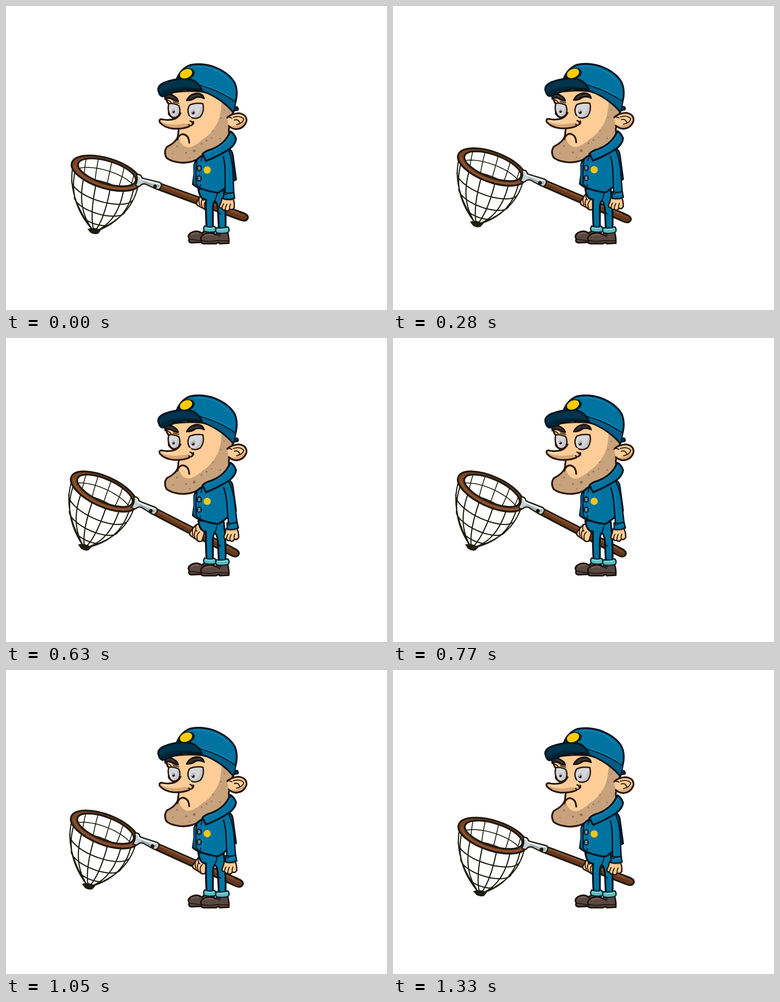
These frames come from a looping animation (838x669 px, 1400 ms). An HTML page:

```html
<!DOCTYPE html>
<html lang="en">
<head>
<meta charset="utf-8">
<title>Man with a landing net</title>
<style>
  html, body { margin: 0; width: 100%; height: 100%; overflow: hidden; background: #fff; }
  svg { display: block; width: 838px; height: 669px; }
  path, ellipse, circle { stroke-linejoin: round; stroke-linecap: round; }
  .line { fill: none; }
  .ink { stroke: #04141f; stroke-width: 4; }
  .skinInk { stroke: #2a160a; stroke-width: 3.8; }
  .mid { stroke-width: 3; }
  .thin { stroke-width: 2.2; }
  .blue { fill: #0073a1; }
  .shade { fill: #005d88; }
  .skin { fill: #fecd97; }
  .glow { fill: none; stroke: #1488b8; stroke-width: 1.8; }
  .wood { fill: #7d4525; }
  .mesh { fill: none; stroke: #1d1c0f; }
</style>
</head>
<body>
<svg viewBox="0 0 838 669" width="838" height="669">
  <defs>
    <clipPath id="hole"><ellipse cx="222" cy="366" rx="66" ry="25" transform="rotate(17 222 366)"/></clipPath>
    <clipPath id="faceClip"><path id="faceShape"/></clipPath>
  </defs>

  <g id="net">
    <path id="backMesh" class="mesh" stroke-width="1.9" clip-path="url(#hole)"/>
    <path id="frontMesh" class="mesh" stroke-width="2.5"/>
    <path d="M179 491 Q193 485 209 493 L203 501 Q194 504 186 499Z" fill="#1d1c0f"/>
    <path d="M339 391 L520 455 Q533 459 532 466 Q529 475 517 471 L336 404Z" class="wood" stroke="#1f1a0d" stroke-width="4.2"/>
    <path d="M340 402 L518 468 Q528 470 529 464 L516 461 L341 398Z" fill="#64361c"/>
    <path d="M344 395 L512 455" class="line" stroke="#9a5a34" stroke-width="1.8"/>
    <g id="rim"></g>
    <path d="M287 371 Q297 369 299 378 L305 380 L338 388 Q344 391 341 398 Q338 406 331 403 L307 392 Q299 390 295 396 Q289 399 285 394 Q291 383 287 371Z" fill="#c3d0d4" stroke="#1f1a0d" stroke-width="2.8"/>
    <path d="M290 374 Q296 374 296 381 L334 391" class="line" stroke="#f3f8f9" stroke-width="2.2"/>
    <path d="M303 387 L327 396" class="line" stroke="#8799a0" stroke-width="2"/>
    <circle cx="328" cy="397" r="4.4" fill="#1f1a0d"/><circle cx="334" cy="396" r="2.6" fill="#96a7ac"/>
    <path class="skin skinInk mid" d="M431 414 Q437 410 443 414 L451 430 L448 448 Q441 452 435 446 L421 439 Q417 434 421 429 L425 422Z"/>
    <path class="line skinInk thin" d="M425 423 Q423 431 427 439 M432 425 Q427 433 432 443 M440 429 Q433 436 438 447 M431 416 Q429 423 434 428"/>
  </g>

  <g id="legs">
    <path class="blue ink" d="M423 402 L479 405 Q484 450 483 489 L468 489 L466 446 Q464 431 459 429 Q455 433 455 448 L455 488 L441 487 Q439 449 440 426 Q426 426 423 402Z"/>
    <path class="line ink thin" d="M459 429 Q463 421 464 413 M468 455 L472 458"/>
    <path class="glow" d="M445 430 L446 481 M478 426 L479 482" opacity=".5"/>
    <path d="M403 512 Q398 505 407 499 Q420 492 431 500 L437 494 L457 496 L460 521 L430 520 L408 521 Q400 520 403 512Z" fill="#5a4740" stroke="#1c1310" stroke-width="3.4"/>
    <path d="M403 513 L430 517" class="line" stroke="#1c1310" stroke-width="2"/>
    <path d="M408 503 Q415 498 423 500" class="line" stroke="#80695f" stroke-width="2.4"/>
    <path d="M430 517 Q425 508 436 502 Q449 496 461 503 L467 497 L487 497 Q491 509 490 522 L470 523 L468 520 L462 523 L434 523 Q428 522 430 517Z" fill="#5a4740" stroke="#1c1310" stroke-width="3.4"/>
    <path d="M431 516 Q449 520 463 516 L489 517 M464 504 L470 507 M466 501 L472 504" class="line" stroke="#1c1310" stroke-width="2"/>
    <path d="M437 506 Q446 501 455 504" class="line" stroke="#80695f" stroke-width="2.4"/>
    <g fill="#58bcc0" stroke="#08252b" stroke-width="2.8">
      <path d="M437 484 Q448 488 459 485 Q464 491 460 497 Q448 499 437 496 Q432 490 437 484Z"/>
      <path d="M463 488 Q476 490 488 486 Q493 492 489 498 Q476 502 463 499 Q459 493 463 488Z"/>
    </g>
    <path d="M439 488 Q449 491 457 488 M466 491 Q477 493 487 490" class="line" stroke="#8fe0df" stroke-width="1.8"/>
  </g>

  <g id="head">
    <use href="#faceShape" class="skin"/>
    <g clip-path="url(#faceClip)">
      <path d="M474 190 Q476 235 465 257 Q450 284 433 293 Q414 311 400 311 Q387 309 381 294 L372 282 L335 320 L350 360 L510 350 L510 190Z" fill="#c7a27c"/>
      <path d="M345 190 Q410 178 455 194 Q478 205 500 235 L500 190Z" fill="#d9a777" opacity=".5"/>
      <g id="stubble" fill="#8f7355"></g>
    </g>
    <use href="#faceShape" class="line skinInk"/>

    <path class="skin" d="M486 246 Q497 236 513 236 Q530 239 529 253 Q524 270 506 271 Q496 270 490 264Z"/>
    <path d="M491 263 Q508 268 526 254 Q521 269 506 270Z" fill="#dba878"/>
    <path class="line skinInk" d="M487 245 Q498 236 513 236 Q530 239 529 253 Q524 270 506 271 Q496 270 490 264"/>
    <path class="line skinInk thin" d="M486 247 Q490 243 497 247 M500 245 Q515 240 523 249 Q521 258 507 261 M502 251 Q511 248 514 257"/>

    <g id="eyes">
      <path id="lidL" class="skinInk mid" d="M358 215 Q368 213 380 219 Q385 230 380 240 Q371 250 362 242 Q354 230 358 215Z"/>
      <path id="lidR" class="skinInk mid" d="M404 218 Q417 212 433 215 Q437 231 428 243 Q416 251 405 244 Q396 231 404 218Z"/>
      <g id="pupils">
        <path d="M377 221 Q382 226 379 236 Q375 245 367 244 Q376 236 377 221Z M430 218 Q434 229 427 240 Q420 247 411 245 Q426 238 430 218Z" fill="#c3c5c9"/>
        <ellipse cx="368.5" cy="231.5" rx="4" ry="5.500" fill="#bdbfc3"/>
        <ellipse cx="412.500" cy="233" rx="5" ry="6.500" fill="#bdbfc3"/>
        <circle cx="368.5" cy="233" r="2.8" fill="#15110f"/>
        <circle cx="411.500" cy="235" r="3.2" fill="#15110f"/>
        <circle cx="367.500" cy="231.500" r="1" fill="#fff"/>
        <circle cx="410.5" cy="233.500" r="1.2" fill="#fff"/>
      </g>
    </g>

    <path class="skin" d="M382 239 Q377 248 365 250 Q351 252 342 249 Q335 250 339 257 Q349 267 366 269 Q392 271 408 263 L407 244Z"/>
    <path d="M340 255 Q362 264 384 260 Q396 257 408 260 Q396 271 370 269 Q349 267 340 255Z" fill="#d7a677"/>
    <path class="line skinInk" d="M384 236 Q378 248 365 250 Q351 252 342 249 Q335 250 339 257 Q349 268 368 270 Q390 271 403 265"/>
    <path class="line skinInk mid" d="M405 253 Q412 255 409 262 Q404 265 402 261 M409 262 Q414 259 412 254"/>
    <path d="M347 253 Q358 256 367 253" class="line" stroke="#ffe5c4" stroke-width="2.4"/>
    <path class="line skinInk" d="M377 294 Q379 284 388 282 Q402 283 403 301"/>
    <path d="M386 290 Q394 286 398 296" class="line" stroke="#ffe1bb" stroke-width="2.2"/>

    <path d="M349 199 Q358 190 370 198 Q379 203 379 210 Q369 209 363 204 Q355 202 350 206Z" fill="#27211f" stroke="#0f0b09" stroke-width="2.4"/>
    <path d="M397 208 Q403 194 419 192 Q434 192 436 204 Q427 199 417 202 Q408 209 397 208Z" fill="#27211f" stroke="#0f0b09" stroke-width="2.4"/>
    <path d="M355 198 Q364 197 371 204 M405 203 Q412 196 426 197" class="line" stroke="#4b4442" stroke-width="1.8"/>
    <path class="line skinInk thin" d="M354 207 Q360 208 363 212 M368 211 L380 214"/>

    <path d="M499 223 L508 222 Q512 225 510 229 L500 231Z" fill="#00314b" class="ink mid"/>
    <path class="blue ink" d="M375 162 Q384 138 405 130 Q428 125 455 133 Q490 146 503 169 Q511 188 505 211 L500 234 Q477 207 444 192 Q420 183 400 185Z"/>
    <path class="shade" d="M421 172 Q469 187 505 210 L500 231 Q477 204 438 188 Q424 184 412 185Z"/>
    <path class="line ink thin" d="M418 172 Q463 182 505 211"/>
    <path class="glow" d="M414 134 Q441 131 464 143 Q480 151 489 163 M432 174 Q466 182 493 199"/>
    <path d="M336 189 Q331 177 347 169 Q375 158 403 161 Q421 164 431 185 Q401 179 372 188 Q355 197 344 199 Q338 197 336 189Z" fill="#00344d" class="ink"/>
    <path d="M339 191 Q370 171 427 182 Q398 179 371 187 Q352 197 344 197Z" fill="#002436"/>
    <path d="M376 160 Q379 143 393 138 Q408 134 414 143 Q418 153 404 160 Q390 163 376 160Z" fill="#071923"/>
    <ellipse cx="396" cy="149" rx="14" ry="9.6" fill="#fdcc05" transform="rotate(-24 396 149)"/>
  </g>

  <g id="torso">
    <path d="M485 315 Q497 314 499 330 L506 382 L491 389 L481 380Z" fill="#003e5d" class="ink"/>
    <path class="blue ink" d="M432 329 Q417 337 414 349 L414 370 L411 392 Q420 400 427 401 Q447 409 467 411 Q474 407 480 402 L489 395 L491 316 L460 320Z"/>
    <path d="M414 348 L419 343 L420 394 L412 391Z" class="shade"/>
    <path class="line ink thin" d="M420 341 Q416 368 419 393 Q423 398 427 401 M428 393 L425 404"/>
    <path class="glow" d="M434 347 Q431 370 433 392" opacity=".6"/>
    <g stroke="#06151e" stroke-width="2.2" fill="#315467">
      <ellipse cx="425" cy="357" rx="4.8" ry="5.8"/><ellipse cx="425" cy="379.5" rx="4.8" ry="5.8"/>
    </g>
    <path d="M423 354 L427 360 M427 354 L423 360 M423 376 L427 383 M427 376 L423 383" stroke="#a9c3ce" stroke-width="1.1"/>
    <circle cx="442.5" cy="361" r="8" fill="#f2c615"/>
  </g>

  <g id="arm">
    <path class="skin skinInk mid" d="M475 423 L499 424 Q503 430 502 444 Q498 450 492 447 Q488 454 482 449 Q476 450 475 445 Q468 445 470 438 Q474 432 475 423Z"/>
    <path class="line skinInk thin" d="M479 435 Q475 441 475 446 M486 436 Q482 443 482 449 M494 436 Q491 442 492 447"/>
    <path d="M478 426 L497 428" class="line" stroke="#d6a274" stroke-width="3"/>
    <path class="blue" d="M479 318 Q492 311 496 326 Q500 347 500 365 L501 412 L481 413 L482 366 Q478 342 479 318Z"/>
    <path class="line ink mid" d="M490 318 Q496 332 499 358 L501 412 M478 332 Q482 347 482 367 L482 412"/>
    <path class="glow" d="M486 339 Q488 362 486 404" opacity=".6"/>
    <path class="blue ink mid" d="M479 410 Q490 414 501 410 L503 423 Q491 428 478 424Z"/>
    <path class="glow" d="M484 416 Q492 418 499 415"/>
    <circle cx="484" cy="413" r="2.4" fill="#315467" stroke="#06151e" stroke-width="1.4"/>
  </g>

  <g id="collar">
    <path class="blue ink" d="M432 326 Q438 319 450 316 Q475 307 487 288 L494 276 Q502 281 506 292 Q505 304 491 315 Q466 331 440 341Z"/>
    <path class="glow" d="M438 325 Q478 312 495 283"/>
    <path class="line ink thin" d="M432 328 L429 341"/>
  </g>
</svg>

<script>
const LOOP = 1400, STEP = 70, TILT = 17;
const COS = Math.cos(TILT * Math.PI / 180), SIN = Math.sin(TILT * Math.PI / 180);
const $ = id => document.getElementById(id);
const move = (id, value) => $(id).setAttribute("transform", value);

$("faceShape").setAttribute("d",
  "M354 192 Q350 207 358 216 L358 238 Q366 249 376 247 L380 270 L378 287 Q374 300 354 310 " +
  "Q346 321 353 334 Q365 344 390 345 Q415 344 430 331 L492 298 L490 272 Q494 246 500 232 Q470 172 354 192Z");

// Bag surface: tilted ellipses shrinking from the rim down to the tip.
function bag(angle, depth) {
  const r = 1 - Math.pow(depth, 2.3);
  const x = 75 * r * Math.cos(angle), y = 29 * r * Math.sin(angle);
  return [220 - 26 * depth + x * COS - y * SIN, 368 + 129 * depth + x * SIN + y * COS];
}

function trace(fn) {
  const pts = [];
  for (let i = 0; i <= 20; i++) pts.push(fn(i / 20).map(v => v.toFixed(1)).join(" "));
  return "M" + pts.join("L");
}

function mesh(start, rows, cords) {
  return cords.map(c => trace(k => bag(start + c * Math.PI, k * 0.985))).join("") +
    rows.map(s => trace(k => bag(start + k * Math.PI, s))).join("");
}

$("frontMesh").setAttribute("d", mesh(0, [0.27, 0.52, 0.77],
  [0, 0.14, 0.28, 0.42, 0.56, 0.7, 0.85, 1]));
$("backMesh").setAttribute("d", mesh(Math.PI, [0.17, 0.35],
  [0.12, 0.26, 0.39, 0.52, 0.65, 0.79, 0.92]));

function oval(cx, cy, a, b) {
  const dx = a * COS, dy = a * SIN, arc = `A${a} ${b} ${TILT} 1 1 `;
  return `M${cx - dx} ${cy - dy}${arc}${cx + dx} ${cy + dy}${arc}${cx - dx} ${cy - dy}Z`;
}

$("rim").innerHTML =
  `<path d="${oval(220, 368, 78.5, 33)}${oval(222, 366, 66, 25)}" class="wood" fill-rule="evenodd" stroke="#1f1a0d" stroke-width="4"/>` +
  `<path d="M151 351Q160 381 219 398Q263 407 287 397" class="line" stroke="#9a5a34" stroke-width="2"/>`;

$("stubble").innerHTML = [
  [414, 319, 3], [396, 323, 2], [376, 309, 1.8], [430, 303, 1.8], [441, 296, 2], [452, 290, 1.4],
  [455, 275, 1.5], [471, 292, 1.8], [473, 247, 1.4], [480, 229, 1.5], [404, 334, 1.4], [367, 325, 1.3]
].map(([x, y, r]) => `<circle cx="${x}" cy="${y}" r="${r}"/>`).join("");

function draw(ms) {
  const t = Math.floor((ms % LOOP) / STEP) * STEP;
  const u = 1 - Math.abs(t - LOOP / 2) / (LOOP / 2);
  const blink = t >= 910 && t < 1050;

  move("net", `translate(${-22 * u} ${10 * u}) rotate(${8.3 * u} 527 464)`);
  move("head", `translate(0 ${-2 * u})`);
  move("torso", `translate(0 ${-1.8 * u})`);
  move("collar", `translate(0 ${-1.8 * u})`);
  move("arm", `translate(0 ${-4 * u}) rotate(${-5.2 * u} 488 322)`);

  for (const id of ["lidL", "lidR"]) $(id).setAttribute("fill", blink ? "#fecd97" : "#d6d7da");
  $("pupils").setAttribute("visibility", blink ? "hidden" : "visible");
}

const start = performance.now();
function tick() {
  draw(performance.now() - start);
  requestAnimationFrame(tick);
}
draw(0);
requestAnimationFrame(tick);
</script>
</body>
</html>
```
